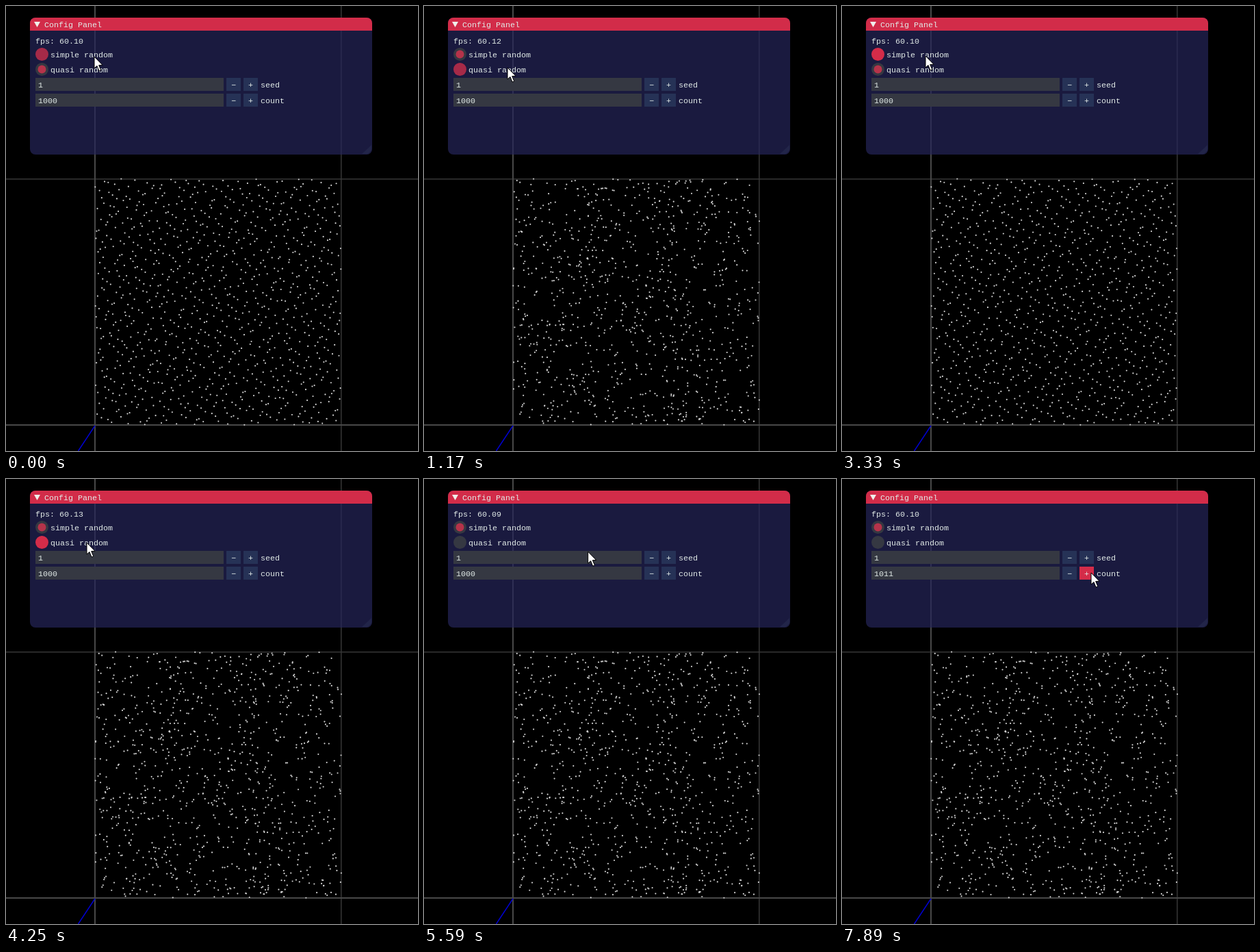
An HTML page with a canvas for the animation above (8 s loop, 602 by 650 pixels).

```html
<!DOCTYPE html>
<html>
<head>
<meta charset="utf-8">
<style>
html, body { margin: 0; width: 100%; height: 100%; overflow: hidden; background: #000; }
canvas { display: block; }
</style>
</head>
<body>
<canvas id="stage" width="602" height="650"></canvas>
<script>
const ctx = document.getElementById('stage').getContext('2d');
const LOOP = 8000, STEP = LOOP / 68, MAX_COUNT = 1011;
const LEFT = 130, BOTTOM = 612, SIDE = 360;
const SIMPLE = 0, QUASI = 1, PLUS = 2, NONE = -1;
const RED = '#d42c49', DARK_RED = '#a62a48', FRAME = '#353842', BUTTON = '#263256';

// Each click on a radio button swaps the point set; the last press holds "+".
const presses = [230, 2020, 3330, 4250, 4860], HOLD = 6200;
const moves = [
  { from: 460, to: 920, x: 122, y: 90 },
  { from: 2500, to: 3000, x: 122, y: 73 },
  { from: 3440, to: 4140, x: 118, y: 93 },
  { from: 4370, to: 4740, x: 118, y: 76 },
  { from: 5230, to: 5960, x: 364, y: 137 }
];

function random(seed) {
  return () => {
    seed = seed + 0x6D2B79F5 | 0;
    let r = Math.imul(seed ^ seed >>> 15, 1 | seed);
    r = r + Math.imul(r ^ r >>> 7, 61 | r) ^ r;
    return ((r ^ r >>> 14) >>> 0) / 4294967296;
  };
}

function halton(i, base) {
  let sum = 0;
  for (let f = 1 / base; i > 0; i = Math.floor(i / base), f /= base) sum += i % base * f;
  return sum;
}

const rnd = random(1), rateRnd = random(60);
const clouds = [() => [rnd(), rnd()], (_, i) => [halton(i + 1, 2), halton(i + 1, 3)]]
  .map(make => Array.from({ length: MAX_COUNT }, make));
const rates = Array.from({ length: 68 }, () => 60.09 + Math.floor(rateRnd() * 5) / 100);

function pointerAt(t) {
  let x = 129, y = 74;
  for (const m of moves) {
    const p = Math.min(1, Math.max(0, (t - m.from) / (m.to - m.from)));
    x += (m.x - x) * p;
    y += (m.y - y) * p;
  }
  return [x, y];
}

function hoverAt(x, y) {
  if (x < 156) return y < 82 ? SIMPLE : QUASI;
  return x > 347 && y > 128 ? PLUS : NONE;
}

function stateAt(t) {
  const [x, y] = pointerAt(t);
  const clicks = presses.filter(p => t >= p + STEP).length;
  return {
    x, y,
    hover: hoverAt(x, y),
    held: t >= HOLD || presses.some(p => t >= p && t < p + STEP),
    selected: clicks % 2 ? SIMPLE : QUASI,
    count: t < HOLD ? 1000 : 1001 + Math.max(0, Math.floor((t - 6440) / 145)),
    fps: rates[Math.floor(t / STEP)].toFixed(2)
  };
}

function rect(x, y, w, h, color) {
  ctx.fillStyle = color;
  ctx.fillRect(x, y, w, h);
}
function disc(x, y, r, color) {
  ctx.fillStyle = color;
  ctx.beginPath();
  ctx.arc(x, y, r, 0, 7);
  ctx.fill();
}
function shape(points, color) {
  ctx.fillStyle = color;
  ctx.beginPath();
  points.forEach(p => ctx.lineTo(...p));
  ctx.closePath();
  ctx.fill();
}
function round(x, y, w, h, r, color) {
  ctx.fillStyle = color;
  ctx.beginPath();
  ctx.roundRect(x, y, w, h, r);
  ctx.fill();
}
function text(s, x, y) {
  ctx.fillStyle = '#e2ebe8';
  ctx.fillText(s, x, y);
}

function drawScene({ selected, count }) {
  rect(0, 0, 602, 650, '#000');
  rect(489, 0, 1.5, 650, '#363636');
  rect(0, 252, 602, 1.5, '#363636');
  rect(129, 0, 2, 650, '#484848');
  rect(0, 611, 602, 2, '#484848');
  ctx.strokeStyle = '#0000d0';
  ctx.lineWidth = 1.5;
  ctx.beginPath();
  ctx.moveTo(130, 613);
  ctx.lineTo(105.5, 650);
  ctx.stroke();
  for (const [u, v] of clouds[selected].slice(0, count))
    disc(LEFT + u * SIDE, BOTTOM - v * SIDE, 1.1, '#d0d0d0');
}

function drawRadio(label, y, on, hot, held) {
  disc(52.5, y, 9.5, !hot ? FRAME : held ? RED : DARK_RED);
  if (on) disc(52.5, y, 6, '#b5334a');
  text(label, 65, y + 4.5);
}

function drawInput(label, value, y, hot, held) {
  rect(43, y, 275, 19, FRAME);
  rect(322, y, 21, 19, BUTTON);
  rect(347, y, 21, 19, !hot ? BUTTON : held ? RED : DARK_RED);
  text(value, 47, y + 14);
  text('\u2212', 329, y + 14);
  text('+', 354, y + 14);
  text(label, 372, y + 14);
}

function drawPanel({ selected, hover, held, count, fps }) {
  round(35, 17, 500, 200, 8, 'rgba(38,38,91,.7)');
  round(35, 17, 500, 19, [8, 8, 0, 0], '#d22c49');
  shape([[534, 203], [534, 211], [529, 216], [520, 216]], '#222549');
  shape([[41, 23], [50, 23], [45.5, 31]], '#f0f0ea');
  text('Config Panel', 56, 31);
  text('fps: ' + fps, 43, 55);
  ['simple random', 'quasi random'].forEach((label, i) =>
    drawRadio(label, 70.5 + 22 * i, selected === i, hover === i, held));
  drawInput('seed', 1, 105, false);
  drawInput('count', count, 128, hover === PLUS, held);
}

function drawPointer({ x, y }) {
  ctx.save();
  ctx.translate(x, y);
  ctx.strokeStyle = '#000';
  ctx.lineWidth = 1;
  shape([[0, 0], [0, 17], [4, 13.5], [7, 21], [9.7, 19.8], [6.7, 12.5], [12, 12.3]], '#fff');
  ctx.stroke();
  ctx.restore();
}

function frame(now) {
  const state = stateAt(now % LOOP);
  ctx.font = '11.667px "Liberation Mono", monospace';
  drawScene(state);
  drawPanel(state);
  drawPointer(state);
  requestAnimationFrame(frame);
}
requestAnimationFrame(frame);
</script>
</body>
</html>
```
